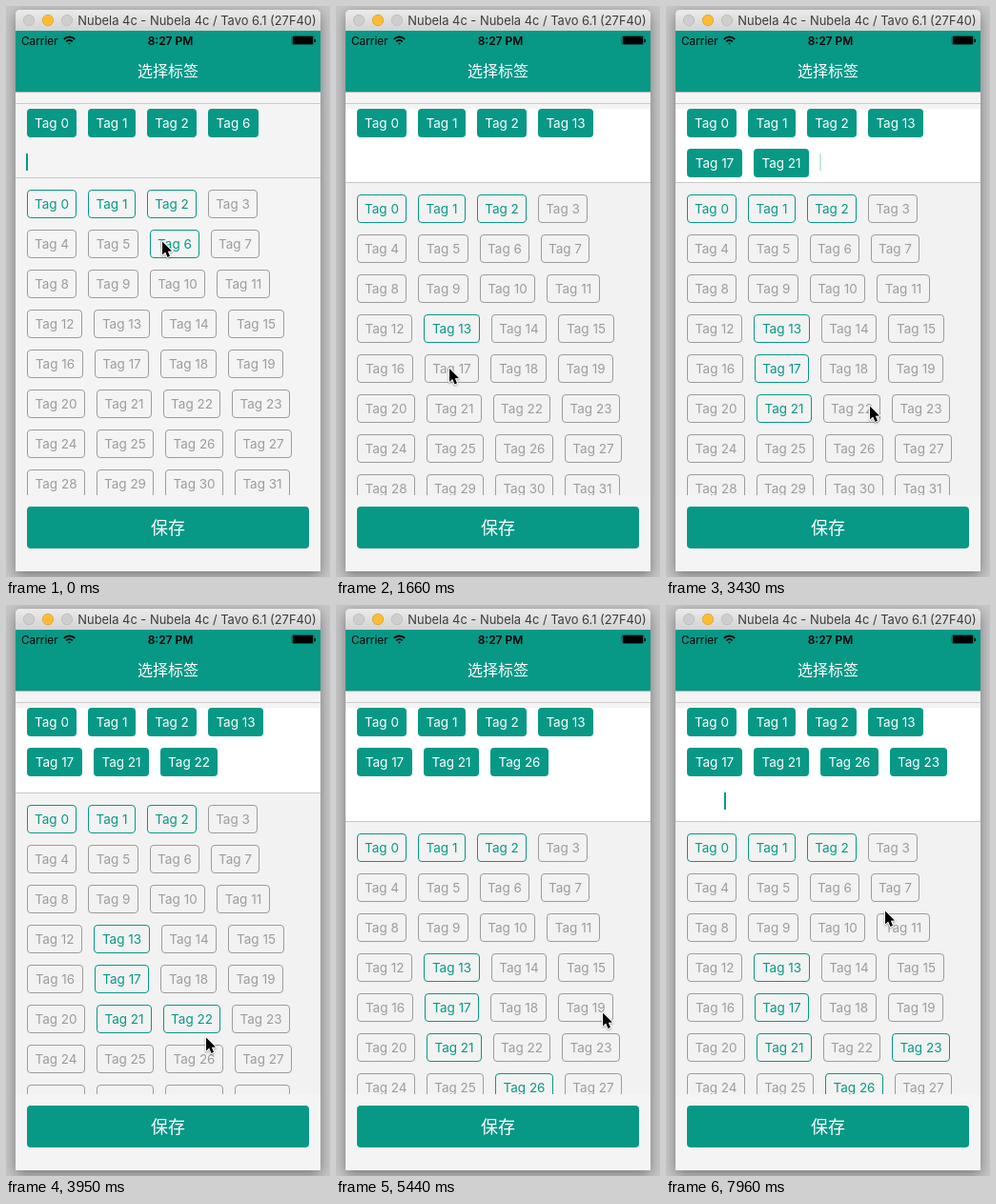
An HTML page with a canvas that plays this animation: 340x600 px, repeating every 8 s.

```html
<!DOCTYPE html>
<html lang="zh">
<head>
<meta charset="utf-8">
<style>
html, body { margin: 0; width: 100%; height: 100%; overflow: hidden; background: #bdbdbd; }
canvas { display: block; }
</style>
</head>
<body>
<canvas id="stage" width="340" height="600"></canvas>
<script>
const c = document.getElementById('stage').getContext('2d');
const LOOP = 8000, GROW = 240, TYPED = 7960;
const TEAL = '#079886', GRAY = '#9c9c9c';
const LATIN = 'Inter, Roboto, sans-serif';
const HAN = '"Noto Sans CJK SC", "Noto Sans CJK", sans-serif';
const ALL = [...Array(40).keys()];

// Where the pointer is at a time, and the tag it taps there, if any
const steps = [
  { t: -187, x: 163, y: 246, tag: 6 },
  { t: 215, x: 163, y: 246, tag: 6 },
  { t: 1050, x: 119, y: 301, tag: 13 },
  { t: 2330, x: 118, y: 380, tag: 17 },
  { t: 2640, x: 111, y: 400 },
  { t: 2990, x: 118, y: 413, tag: 21 },
  { t: 3866, x: 213, y: 419, tag: 22 },
  { t: 3950, x: 209, y: 453 },
  { t: 4531, x: 218, y: 466, tag: 22 },
  { t: 4960, x: 196, y: 469, tag: 26 },
  { t: 5440, x: 279, y: 427 },
  { t: 6310, x: 272, y: 458, tag: 23 },
  { t: 7400, x: 272, y: 392 },
  { t: LOOP, x: 229, y: 320 }
];

const clamp = v => Math.max(0, Math.min(1, v));
const ease = v => (v = clamp(v)) * v * (3 - 2 * v);
const mix = (a, b, k) => a + (b - a) * k;

function rect(x, y, w, h, fill) {
  c.fillStyle = fill;
  c.fillRect(x, y, w, h);
}

function rounded(x, y, w, h, r) {
  c.beginPath();
  c.roundRect(x, y, w, h, r);
}

function fillRounded(x, y, w, h, r, fill) {
  rounded(x, y, w, h, r);
  c.fillStyle = fill;
  c.fill();
}

function text(str, x, y, font, fill, align = 'center') {
  c.font = font;
  c.fillStyle = fill;
  c.textAlign = align;
  c.fillText(str, x, y);
}

function dot(x, y, fill, edge) {
  c.beginPath();
  c.arc(x, y, 5.7, 0, 7);
  c.fillStyle = fill;
  c.fill();
  c.strokeStyle = edge;
  c.lineWidth = .8;
  c.stroke();
}

function clipped(y, bottom, draw) {
  c.save();
  c.beginPath();
  c.rect(10, y, 320, bottom - y);
  c.clip();
  draw();
  c.restore();
}

const digitWidth = d => d === '1' ? 6.2 : d === '7' ? 7.6 : '468'.includes(d) ? 8.7 : 8.41;
const tagWidth = n => [...String(n)].reduce((w, d) => w + digitWidth(d), 43.7);

// Flows tags into rows; returns the place left for the input caret
function flow(tags, top, draw = () => {}) {
  let x = 22, row = 0;
  const wrap = w => { if (x + w > 318) { x = 22; row++; } };
  for (const n of tags) {
    const w = tagWidth(n);
    wrap(w);
    const left = Math.round(x);
    draw(n, left, top + 42 * row, Math.round(x + w) - left);
    x += w + 12;
  }
  wrap(100);
  return { x, row };
}

// Chosen tags, time of the last tap and panel height in rows
function stateAt(t) {
  let chosen = [0, 1, 2], rows = 1, tapped;
  for (const s of steps) {
    if (s.t > t || s.tag === undefined) continue;
    chosen = chosen.includes(s.tag) ? chosen.filter(n => n !== s.tag) : [...chosen, s.tag];
    rows = mix(rows, flow(chosen, 0).row + 1, ease((t - s.t) / GROW));
    tapped = s.t;
  }
  return { chosen, tapped, bottom: Math.round(101 + 42 * rows) };
}

function label(n, x, y, w, fill) {
  text('Tag ' + n, x + w / 2, y + 20, '13.5px ' + LATIN, fill);
}

function filledTag(n, x, y, w) {
  fillRounded(x, y, w, 30, 4, TEAL);
  label(n, x, y, w, '#fff');
}

function blink(age) {
  const p = age % 1170;
  return p < 1000 ? 1 - clamp((p - 310) / 170) : (p - 1000) / 170;
}

function drawCaret(t, { x, row }, tapped) {
  const typed = t >= TYPED;
  c.globalAlpha = blink(t - (typed ? TYPED : tapped));
  rect(Math.round(x) - 1 + (typed ? 40 : 0), 113 + 42 * row, 2, 18, TEAL);
  c.globalAlpha = 1;
}

// The pointer travels in the first half of each step, then rests
function drawPointer(t) {
  const i = steps.findIndex(s => s.t > t), a = steps[i - 1], b = steps[i];
  const k = ease((t - a.t) / (b.t - a.t) * 2);
  c.save();
  c.translate(mix(a.x, b.x, k) + 1, mix(a.y, b.y, k) + 1.5);
  c.beginPath();
  for (const [x, y] of [[0, 0], [0, 14], [3.2, 11], [5.5, 16.4], [8, 15.3], [5.8, 10.2], [10, 10]]) c.lineTo(x, y);
  c.closePath();
  c.lineJoin = 'round';
  c.strokeStyle = '#fff';
  c.lineWidth = 2;
  c.shadowColor = 'rgba(0,0,0,.35)';
  c.shadowBlur = 2;
  c.shadowOffsetY = 1;
  c.stroke();
  c.shadowColor = 'transparent';
  c.fillStyle = '#000';
  c.fill();
  c.restore();
}

function drawWindow() {
  rect(0, 0, 340, 600, '#c6c6c6');
  c.save();
  c.shadowColor = 'rgba(0,0,0,.4)';
  c.shadowBlur = 14;
  c.shadowOffsetY = 4;
  fillRounded(10, 4, 320, 590, [5, 5, 0, 0], '#f4f4f4');
  c.restore();
  const bar = c.createLinearGradient(0, 4, 0, 26);
  bar.addColorStop(0, '#ebebeb');
  bar.addColorStop(1, '#d3d3d3');
  fillRounded(10, 4, 320, 22, [5, 5, 0, 0], bar);
  dot(24, 15, '#cecece', '#b9b9b9');
  dot(44, 15, '#fdbc34', '#dda02c');
  dot(64, 15, '#cecece', '#b9b9b9');
  text('Nubela 4c - Nubela 4c / Tavo 6.1 (27F40)', 200.5, 20, '12.9px ' + LATIN, '#3b3b3b');
}

function drawHeader() {
  rect(10, 26, 320, 64, TEAL);
  text('Carrier', 16, 40.5, '11.8px ' + LATIN, '#000', 'left');
  c.strokeStyle = '#000';
  c.lineWidth = 1.8;
  for (const r of [1, 4.5, 8]) {
    c.beginPath();
    c.arc(66.5, 40.5, r, -Math.PI * .75, -Math.PI * .25);
    c.stroke();
  }
  text('8:27 PM', 172.5, 40.5, '600 12px ' + LATIN, '#000');
  fillRounded(301, 32, 21, 8, 1, '#000');
  rounded(300, 31.5, 23, 9, 2);
  c.strokeStyle = 'rgba(0,0,0,.5)';
  c.lineWidth = .8;
  c.stroke();
  rect(323.5, 35, 1.5, 3, '#000');
  text('选择标签', 170, 74, '16px ' + HAN, '#fff');
  rect(10, 90, 320, 1, '#b4b4b4');
  rect(10, 102, 320, 1, '#cbcbcb');
}

function draw(t) {
  const { chosen, tapped, bottom } = stateAt(t);
  drawWindow();
  drawHeader();
  if (t >= 90) {
    rect(10, 108, 320, bottom - 108, '#fff');
    rect(10, bottom, 320, 514 - bottom, '#f2f2f2');
  }
  clipped(103, bottom + 1, () => drawCaret(t, flow(chosen, 108, filledTag), tapped));
  rect(10, bottom, 320, 1, '#c8c8c8');
  clipped(bottom + 1, 514, () => flow(ALL, bottom + 13, (n, x, y, w) => {
    const color = chosen.includes(n) ? TEAL : GRAY;
    rounded(x + .5, y + .5, w - 1, 29, 3.5);
    c.strokeStyle = color;
    c.lineWidth = 1;
    c.stroke();
    label(n, x, y, w, color);
  }));
  fillRounded(22, 526, 296, 44, 4, TEAL);
  text('保存', 170, 555, '18px ' + HAN, '#fff');
  drawPointer(t);
}

const begin = performance.now();
function frame() {
  draw((performance.now() - begin) % LOOP);
  requestAnimationFrame(frame);
}
frame();
</script>
</body>
</html>
```
